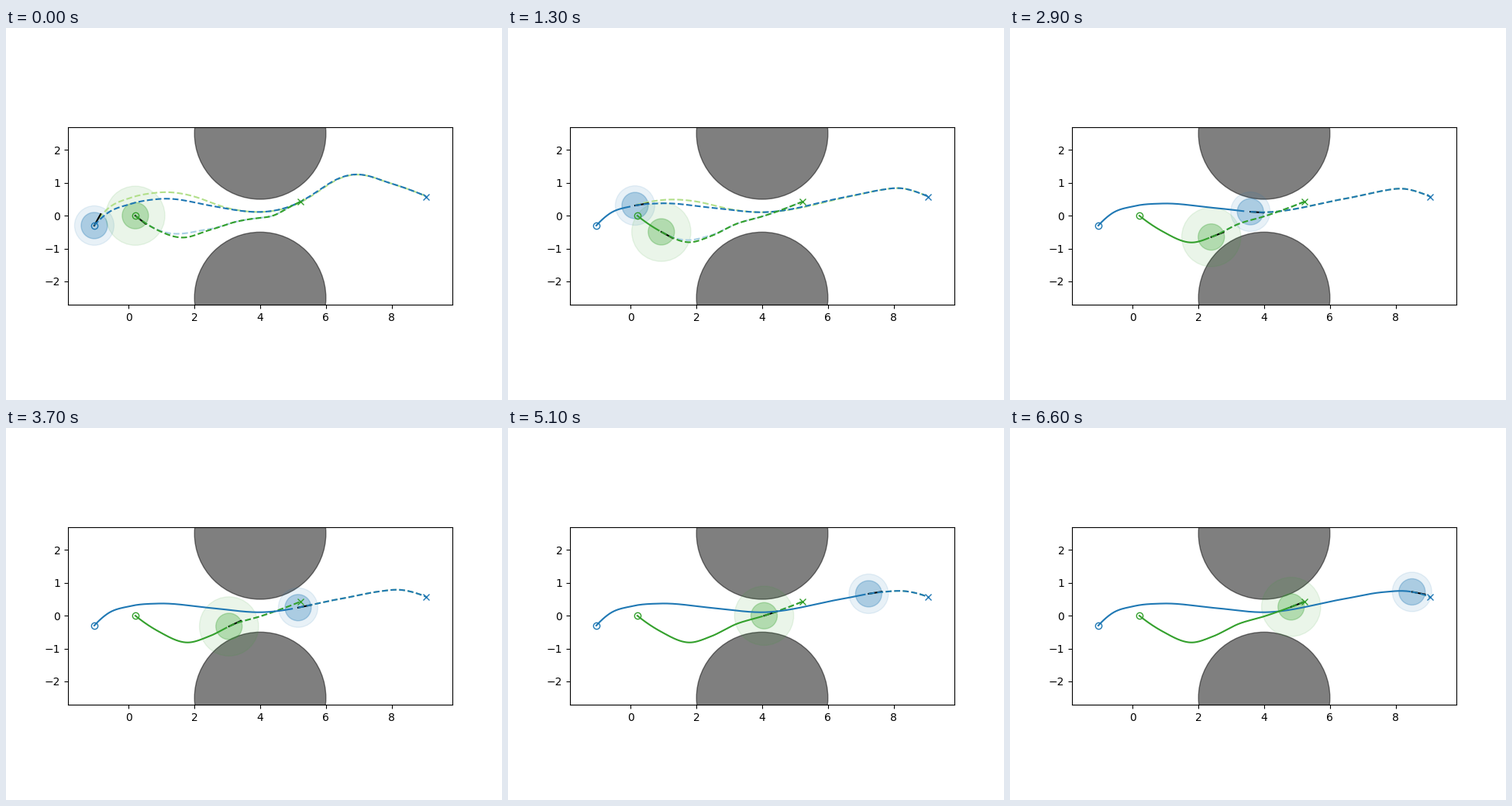
These frames come from a looping animation (640x480 px, 6.7 s). A matplotlib script:

```python
import matplotlib.pyplot as plt
import numpy as np
from matplotlib.animation import FuncAnimation
from matplotlib.patches import Circle

STEPS = 67
BLUE, GREEN = "#1f78b4", "#33a02c"
PALE_BLUE, PALE_GREEN = "#a6cee3", "#b2df8a"


def curve(*pts):
    """Smooth cubic Hermite curve through a few key points."""
    x, y = np.array(pts, float).T
    m = np.gradient(y, x, edge_order=2)

    def f(q):
        i = np.clip(np.searchsorted(x, q, side="right") - 1, 0, len(x) - 2)
        h = x[i + 1] - x[i]
        t = (q - x[i]) / h
        return ((1 + 2 * t) * (1 - t) ** 2 * y[i] + t * (1 - t) ** 2 * h * m[i]
                + t * t * (3 - 2 * t) * y[i + 1] + t * t * (t - 1) * h * m[i + 1])

    return f


def sigmoid(z):
    return 1 / (1 + np.exp(-z))


def bump(x, mid, width):
    return np.exp(-((x - mid) / width) ** 2)


def rise(d, width):
    return 1 - np.exp(-d / width)


# First guess of each agent, relative to the path it ends up taking.
def blue_guess(x):
    return 0.15 * bump(x, 1.3, 1.35) + 0.67 * bump(x, 6.7, 1.25)


def green_guess(x):
    return 0.2 * bump(x, 2.2, 0.9) - 0.11 * bump(x, 4.4, 0.45)


# How far the other agent's prediction lies from the plan.
def blue_gap(x):
    return 0.2 * sigmoid((2.5 - x) / 0.25) - 0.025 * bump(x, 5.7, 1)


def green_gap(x):
    return 0.13 * bump(x, 1.75, 0.6)


class Agent:
    def __init__(self, ax, color, pale, reach, start, goal, pos, path, guess,
                 gap, drift=0, turn=0):
        self.start, self.goal, self.pos, self.path = start, goal, pos, path
        self.guess, self.gap, self.drift, self.turn = guess, gap, drift, turn
        self.discs = [ax.add_patch(Circle((0, 0), r, color=color, alpha=a))
                      for r, a in ((reach, 0.1), (0.4, 0.3))]
        self.other, = ax.plot([], [], "--", color=pale)
        self.nose, = ax.plot([], [], "k-", zorder=2.1)
        self.ahead, = ax.plot([], [], "--", color=color, zorder=2.2)
        self.trail, = ax.plot([], [], color=color, zorder=2.3)
        for x, mark in ((start, "o"), (goal, "x")):
            ax.plot(x, path(x), mark, color=color, mfc="none", zorder=2.4)

    def update(self, k):
        x = self.pos(k)
        y = self.path(x)
        for disc in self.discs:
            disc.center = x, y

        angle = np.arctan2(self.path(x + 0.1) - y, 0.1) + self.turn * np.exp(-k / 2)
        self.nose.set_data([x, x + 0.4 * np.cos(angle)],
                           [y, y + 0.4 * np.sin(angle)])

        q = np.linspace(x, self.goal, 240)
        fresh = np.exp(-k / 4.5)
        late = self.drift * bump(q, 8.1, 0.7) * sigmoid((38 - k) / 4)
        plan = self.path(q) + rise(q - x, 0.02 + 0.05 * k) * (
            fresh * self.guess(q) + (1 - fresh) * late)
        gap = self.gap(q) * rise(q - x, 0.4 + 0.05 * k) * sigmoid((16 - k) / 1.2)
        self.ahead.set_data(q, plan)
        self.other.set_data(q, plan + gap)

        # The trail ends one step behind the agent.
        past = np.linspace(self.start, self.pos(max(k - 1, 0)), 240)
        self.trail.set_data(past, self.path(past))


fig, ax = plt.subplots(figsize=(6.4, 4.8), dpi=100)
ax.set_aspect("equal")
for side in (2.5, -2.5):
    ax.add_patch(Circle((4, side), 2, color="k", alpha=0.5))

agents = [
    Agent(ax, BLUE, PALE_GREEN, 0.6, -1.05, 9.05,
          pos=curve((0, -1.05), (6, -0.8), (13, 0.13), (21, 1.81), (29, 3.58),
                    (45, 6.47), (58, 7.94), (66, 8.5)),
          path=curve((-1.05, -0.3), (-0.67, 0.045), (0.035, 0.29), (0.9, 0.37),
                     (2.5, 0.235), (4, 0.105), (6.45, 0.515), (7.6, 0.715),
                     (8.4, 0.74), (9.05, 0.57)),
          guess=blue_guess, gap=blue_gap, drift=0.08, turn=0.25),
    Agent(ax, GREEN, PALE_BLUE, 0.9, 0.2, 5.23,
          pos=curve((0, 0.2), (13, 0.93), (21, 1.68), (29, 2.39), (45, 3.65),
                    (58, 4.47), (66, 4.82)),
          path=curve((0.2, 0), (0.9, -0.475), (1.8, -0.815), (2.44, -0.63),
                     (3.22, -0.25), (4, -0.02), (5.23, 0.43)),
          guess=green_guess, gap=green_gap),
]
ax.set(xlim=(-1.85, 9.85), ylim=(-2.705, 2.695))


def draw(k):
    for agent in agents:
        agent.update(k)


anim = FuncAnimation(fig, draw, frames=STEPS, interval=100, init_func=lambda: draw(0),
                     repeat=True, repeat_delay=0)
plt.show()
```
